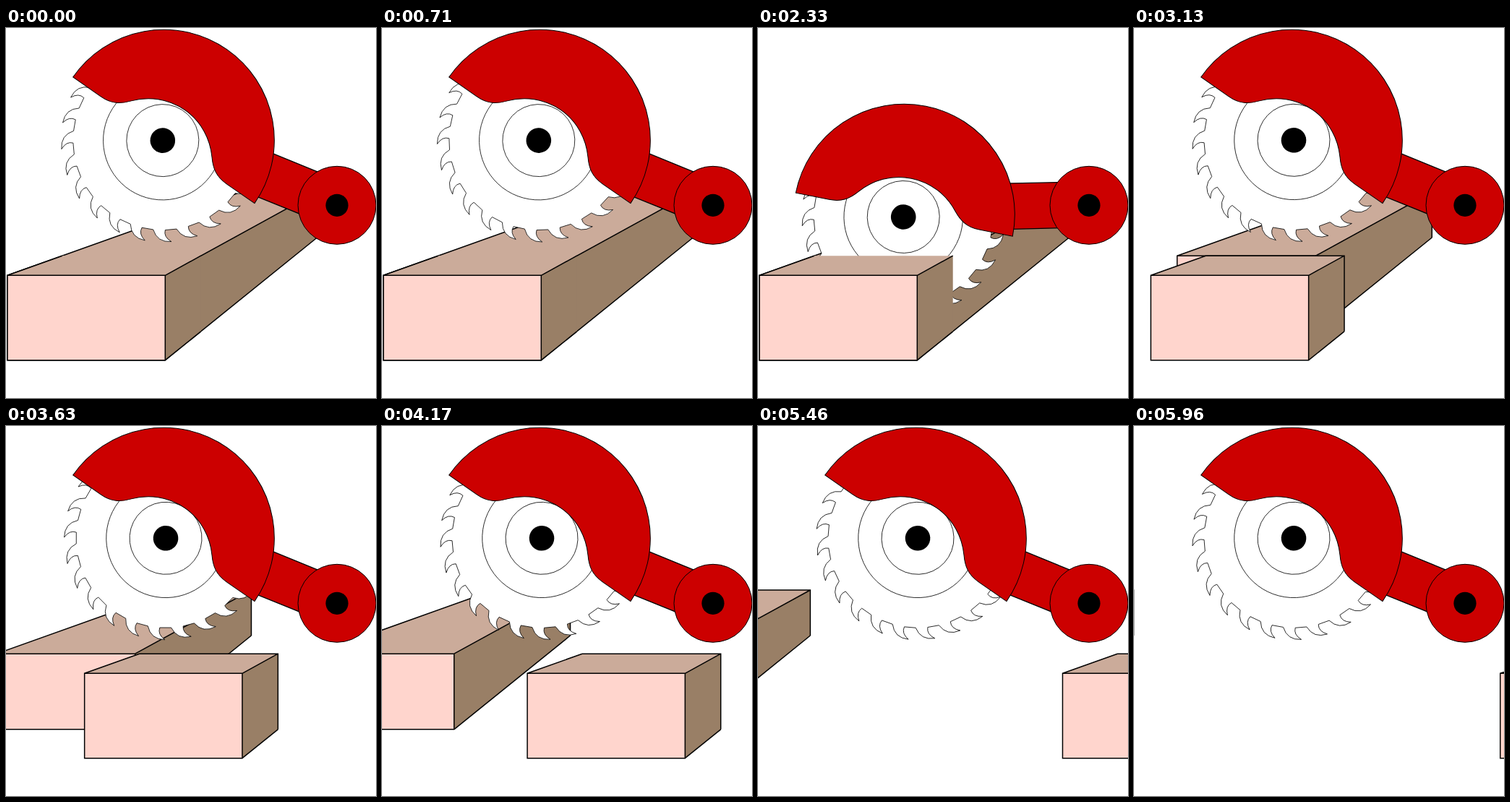
These frames come from a looping animation (512 px wide and 512 px high, 6000 ms). An HTML page:

```html
<!DOCTYPE html>
<html>
<head>
<meta charset="utf-8">
<style>
html, body { margin: 0; width: 100%; height: 100%; overflow: hidden; background: #fff; }
svg { display: block; width: 100vw; height: 100vh; }
.front { fill: #ffd5cd; }
.top { fill: #cbab9a; }
.side { fill: #997f66; }
.edge { fill: none; stroke: #000; stroke-width: 1.5; }
.red { fill: #c00; stroke: #000; }
.steel { fill: #fff; stroke: #000; stroke-width: .75; }
</style>
</head>
<body>
<svg viewBox="0 0 512 512">
  <g id="beam"></g>
  <g id="rest"></g>
  <g id="blade">
    <path id="teeth" class="steel"/>
    <circle class="steel" r="82.3"/>
    <circle class="steel" r="50"/>
    <circle r="17.3"/>
  </g>
  <g id="piece"></g>
  <g id="arm">
    <path class="red" stroke-width="1.4" d="M330 157.6 L440 202.7 L420 262.7 L330 226.3Z"/>
    <path class="red" transform="translate(218.3 155.3) rotate(34.8)"
      d="M-153 0 A153 153 0 0 1 153 0 L106 0 C88 0 78 -7 68 -19 C52 -38 28 -51 0 -51 C-28 -51 -52 -38 -68 -19 C-78 -7 -88 0 -106 0Z"/>
  </g>
  <circle class="red" cx="458" cy="245.3" r="54"/>
  <circle cx="458" cy="245.3" r="15.6"/>
</svg>
<script>
const LOOP = 6000, FPS = 24;
const DROP = 24, BOTTOM = 60, SPLIT = 72;
const PIVOT = { x: 458, y: 245.3 };
const CUT = 0.235;
const CUTTING_SPIN = 7.23, IDLE_SPIN = 4.2;
const el = id => document.getElementById(id);
const rad = deg => deg * Math.PI / 180;
const mix = (a, b, k) => a + (b - a) * k;
const clamp = k => Math.min(1, Math.max(0, k));

// Beam corners run from the near face (depth 0) to the far end (depth 1).
const corners = {
  tl: [[2, 342.3], [325, 227]],
  tr: [[220.3, 342.3], [430.5, 227]],
  bl: [[2, 459.7], [325, 290]],
  br: [[220.3, 459.7], [430.5, 290]]
};

function block(near, far, capped) {
  const at = (name, depth) => [0, 1].map(i => mix(corners[name][0][i], corners[name][1][i], depth).toFixed(1)).join(' ');
  const poly = (...pts) => 'M' + pts.join(' L') + 'Z';
  const [tl, tr, bl, br] = ['tl', 'tr', 'bl', 'br'].map(name => at(name, near));
  const [TL, TR, BR] = ['tl', 'tr', 'br'].map(name => at(name, far));
  const cap = capped ? `M${TL} L${TR} L${BR}` : '';
  return `<path class="top" d="${poly(tl, tr, TR, TL)}"/>
    <path class="side" d="${poly(tr, br, BR, TR)}"/>
    <path class="front" d="${poly(tl, tr, br, bl)}"/>
    <path class="edge" d="${poly(tl, tr, br, bl)} M${tl} L${TL} M${tr} L${TR} M${br} L${BR} ${cap}"/>`;
}

function toothedEdge(count, inner, outer) {
  const step = 360 / count;
  const p = (deg, r) => `${(r * Math.cos(rad(deg))).toFixed(2)} ${(r * Math.sin(rad(deg))).toFixed(2)}`;
  let d = '';
  for (let i = count; i > 0; i--) {
    const tip = i * step;
    d += `${d ? 'L' : 'M'}${p(tip + 11, inner)} Q${p(tip + 8, outer + 1)} ${p(tip, outer)} Q${p(tip + 4.5, outer - 7)} ${p(tip + 3.3, inner)}`;
  }
  return d + 'Z';
}

el('teeth').setAttribute('d', toothedEdge(24, 124, 140.5));
el('beam').innerHTML = block(0, 1, true);
el('rest').innerHTML = block(CUT, 1, true);

let cutShown = null;
function showCut(isCut) {
  if (isCut === cutShown) return;
  cutShown = isCut;
  el('beam').style.display = isCut ? 'none' : '';
  el('rest').style.display = isCut ? '' : 'none';
  el('piece').innerHTML = block(0, CUT, isCut);
}

const place = (id, value) => el(id).setAttribute('transform', value);

function draw(ms) {
  const n = Math.floor((ms % LOOP + 4.9) * FPS / 1000) % 144;
  const back = clamp((n - BOTTOM) / (SPLIT - BOTTOM));
  const lowered = clamp((n - DROP) / (BOTTOM - DROP)) * (1 - back);
  const slide = Math.max(0, n - SPLIT);

  place('arm', `rotate(${-26.4 * lowered} ${PIVOT.x} ${PIVOT.y})`);

  const swing = rad(mix(20.4, 20.8, back) - 27 * lowered);
  const reach = mix(257.3, 253.5, back);
  const x = PIVOT.x - reach * Math.cos(swing);
  const y = PIVOT.y - reach * Math.sin(swing);
  const spin = n * (n < BOTTOM ? CUTTING_SPIN : IDLE_SPIN);
  place('blade', `translate(${x} ${y}) rotate(${10.1 + spin})`);

  showCut(n >= SPLIT);
  place('piece', `translate(${7.11 * slide} 0)`);
  place('rest', `translate(${-6.07 * slide} 0)`);
}

const start = performance.now();
function tick() {
  draw(performance.now() - start);
  requestAnimationFrame(tick);
}
tick();
</script>
</body>
</html>
```
